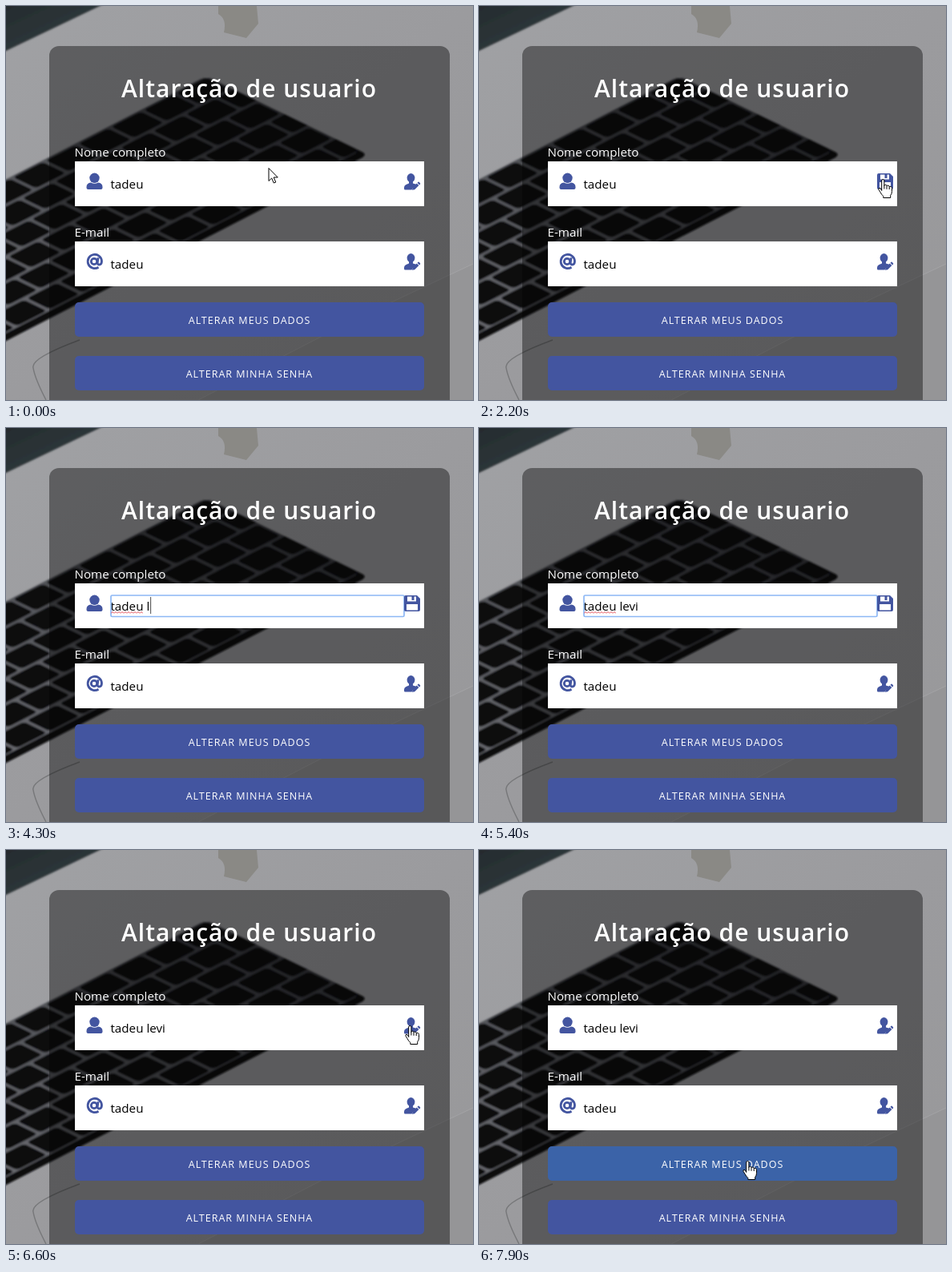
An HTML page that plays this animation: 583 by 492 pixels, repeating every 8 s.

```html
<!DOCTYPE html>
<html lang="pt">
<head>
<meta charset="utf-8">
<title>Altaração de usuario</title>
<style>
html, body { margin: 0; width: 100%; height: 100%; overflow: hidden; background: #9a9a9c; }
svg { display: block; width: 583px; height: 492px; font-family: "Open Sans", "Noto Sans", sans-serif; }
.title { font-size: 30px; font-weight: 600; letter-spacing: 1px; }
.label, .value { font-size: 15.2px; }
.value { fill: #000; }
.caption { font-size: 12.5px; font-weight: 500; letter-spacing: 1px; }
.title, .label, .caption { fill: #fff; }
.title, .caption { text-anchor: middle; }
.blue { fill: #4355a0; }

/* One loop is 8 s, so 1% is 80 ms. */
.step { animation: 8s step-end infinite; }
#pointer { animation-name: move; }
#arrow { animation-name: arrow; }
#hand { animation-name: hand; }
#ibeam { animation-name: ibeam; }
#typing { animation-name: type; }
#caret { animation-name: blink; }
.focus { animation-name: focus; }
#edit1 { animation-name: edit; }
#save1 { animation-name: save; }
#wave2 { animation-name: wave; }
#main { animation: hover 8s linear infinite; }

@keyframes move {
  0% { transform: translate(328px, 202px); }
  7.5% { transform: translate(328px, 203px); }
  8.75% { transform: translate(395px, 214px); }
  10% { transform: translate(488px, 232px); }
  11.25% { transform: translate(535px, 234px); }
  12.5% { transform: translate(519px, 225px); }
  13.75% { transform: translate(504px, 216px); }
  75% { transform: translate(498px, 221px); }
  76.25% { transform: translate(502px, 221px); }
  78.75% { transform: translate(504px, 219px); }
  87.5% { transform: translate(478px, 246px); }
  88.75% { transform: translate(425px, 300px); }
  90% { transform: translate(367px, 354px); }
  91.25% { transform: translate(345px, 377px); }
  92.5% { transform: translate(341px, 381px); }
  93.75% { transform: translate(338px, 384px); }
  95% { transform: translate(337px, 386px); }
  96.25% { transform: translate(336px, 387px); }
  97.5%, 100% { transform: translate(335px, 388px); }
}
@keyframes arrow {
  0%, 7.5%, 87.5% { visibility: visible; }
  1.25%, 13.75%, 91.25%, 100% { visibility: hidden; }
}
@keyframes hand {
  0%, 31.25%, 87.5% { visibility: hidden; }
  13.75%, 75%, 91.25%, 100% { visibility: visible; }
}
@keyframes ibeam {
  0%, 71.25%, 100% { visibility: hidden; }
  70% { visibility: visible; }
}
@keyframes type {
  0% { transform: translateX(171.7px); }
  45% { transform: translateX(175.7px); }
  53.75% { transform: translateX(179.5px); }
  56.25% { transform: translateX(188px); }
  58.75% { transform: translateX(195.6px); }
  61.25%, 100% { transform: translateX(199.7px); }
}
@keyframes blink {
  0%, 41.25%, 51.25%, 67.5%, 81.25%, 100% { visibility: hidden; }
  35%, 45%, 53.75%, 73.75% { visibility: visible; }
}
@keyframes focus {
  0%, 81.25%, 100% { visibility: hidden; }
  35% { visibility: visible; }
}
@keyframes wave {
  0%, 81.25%, 100% { visibility: hidden; }
  73.75% { visibility: visible; }
}
@keyframes edit {
  0%, 81.25%, 100% { visibility: visible; }
  23.75% { visibility: hidden; }
}
@keyframes save {
  0%, 81.25%, 100% { visibility: hidden; }
  23.75% { visibility: visible; }
}
@keyframes hover {
  0%, 91.25% { fill: #4355a0; }
  98.75%, 100% { fill: #3b63a8; }
}
</style>
</head>
<body>
<svg viewBox="0 0 583 492">
  <defs>
    <linearGradient id="metal" x2="1" y2="1">
      <stop offset="0" stop-color="#a0a1a4"/>
      <stop offset=".5" stop-color="#9b9b9e"/>
      <stop offset="1" stop-color="#98989a"/>
    </linearGradient>
    <linearGradient id="screen" x2="1" y2="1">
      <stop offset="0" stop-color="#22292c"/>
      <stop offset="1" stop-color="#384145"/>
    </linearGradient>
    <linearGradient id="gaps" x2="0" y2="1">
      <stop offset="0" stop-color="#3c3d42"/>
      <stop offset="1" stop-color="#77787d"/>
    </linearGradient>
    <filter id="soft"><feGaussianBlur stdDeviation="1.300"/></filter>
    <!-- Two staggered rows of keys -->
    <pattern id="keys" width="20" height="12" patternUnits="userSpaceOnUse">
      <g fill="#090a0f">
        <rect x=".5" y=".5" width="9" height="11" rx="1.300"/>
        <rect x="10.500" y="-5.500" width="9" height="11" rx="1.300"/>
        <rect x="10.500" y="6.500" width="9" height="11" rx="1.300"/>
      </g>
    </pattern>
    <pattern id="zigzag" x="131" y="229" width="4" height="3" patternUnits="userSpaceOnUse">
      <path d="M0 2.5L2 .5L4 2.5" fill="none" stroke="#e5414b"/>
    </pattern>
    <g id="edit" class="blue">
      <ellipse cx="8.500" cy="5.600" rx="4.900" ry="5.600"/>
      <path d="M6 10h5v2.500l4.300 1.300l-5 5.100l-.7 1.600H1.200Q0 20.500 0 19c0-3.500 1-4.600 6-6.400z"/>
      <path d="M10 20.800l.6-3.100l5.200-5.200l2.600 2.600l-5.200 5.200zM16.500 11.800l1-1q.6-.5 1.200 0l1.300 1.400q.5.600 0 1.200l-.9 1z"/>
    </g>
    <path id="save" class="blue" fill-rule="evenodd" d="M2 0H16L20 4V18Q20 20 18 20H2Q0 20 0 18V2Q0 0 2 0zM4 1.500V7.500H15V1.500H12.500V6H9.500V1.500zM3 11V18.500H17V11z"/>
  </defs>

  <!-- Laptop on a desk -->
  <rect width="583" height="492" fill="url(#metal)"/>
  <path d="M265 0H313L315 22L300 40L272 33Q276 16 265 10z" fill="#8a8985"/>
  <path d="M-10 -10H138L0 56L-10 60z" fill="url(#screen)" filter="url(#soft)"/>
  <path d="M583 322L430 394L240 492H583z" fill="#959597"/>
  <path d="M583 322L430 394L240 492" fill="none" stroke="#a3a3a5"/>
  <path d="M92 417Q30 440 34 452Q36 465 50 492" fill="none" stroke="#77787a" stroke-width="1.500"/>
  <g filter="url(#soft)">
    <g transform="matrix(3.2 1.55 -3.4 1.75 250 88)">
      <rect width="63" height="170" rx="2" fill="#0b0c11"/>
      <rect width="60" height="170" rx="2" fill="url(#gaps)"/>
      <rect width="60" height="170" rx="2" fill="url(#keys)"/>
    </g>
  </g>

  <!-- Form -->
  <rect x="54" y="50" width="500" height="470" rx="12" fill="#000" fill-opacity=".41"/>
  <text class="title" x="303.500" y="114">Altaração de usuario</text>
  <text class="label" x="85.500" y="188">Nome completo</text>
  <text class="label" x="85.500" y="288">E-mail</text>
  <path d="M86 194H522V250H86zM86 294H522V350H86z" fill="#fff"/>

  <g class="blue">
    <circle cx="110.500" cy="214.800" r="6.200"/>
    <path d="M106 220.500Q110.500 223 115 220.500Q120.500 221 120.500 226V227Q120.500 229 118.500 229H102.500Q100.500 229 100.500 227V226Q100.500 221 106 220.500z"/>
  </g>
  <g fill="none" stroke="#4355a0" stroke-width="2.800">
    <circle cx="110" cy="319" r="3.700"/>
    <path d="M115.500 326.300A8.700 8.700 0 1 1 119.500 318.500C119.500 324 114.200 324.300 114.200 320.500L115 314.300"/>
  </g>

  <text class="value" x="130.500" y="228">tadeu levi</text>
  <text class="value" x="130.500" y="328">tadeu</text>

  <!-- White cover follows the caret and hides what is not typed yet -->
  <g id="typing" class="step">
    <rect x=".3" y="211" width="60" height="22" fill="#fff"/>
    <rect id="caret" class="step" y="211" width="1.200" height="21" fill="#000"/>
  </g>
  <rect class="step focus" x="131" y="209" width="366" height="26.500" rx="1.500" fill="none" stroke="#8db8f5" stroke-width="1.700"/>
  <rect class="step focus" x="131" y="229" width="40" height="3" fill="url(#zigzag)"/>
  <rect id="wave2" class="step" x="176" y="229" width="24" height="3" fill="url(#zigzag)"/>
  <path id="ibeam" class="step" d="M366 209H373" stroke="#3c4a60" stroke-width="2"/>

  <g id="edit1" class="step"><use href="#edit" x="497" y="209"/></g>
  <g id="save1" class="step"><use href="#save" x="497" y="209"/></g>
  <use href="#edit" x="497" y="309"/>

  <rect id="main" x="86" y="370" width="436" height="43" rx="5"/>
  <rect class="blue" x="86" y="437" width="436" height="43" rx="5"/>
  <text class="caption" x="304" y="397">ALTERAR MEUS DADOS</text>
  <text class="caption" x="304" y="464">ALTERAR MINHA SENHA</text>

  <g id="pointer" class="step" fill="#fff" stroke="#000" stroke-linejoin="round">
    <path id="arrow" class="step" d="M0 .5V16.500L3.700 13L6.300 19L8.800 18L6.200 12H11.300z"/>
    <g id="hand" class="step">
      <path d="M-1.300 14.500V2Q-1.300 .5 .3 .5Q1.900 .5 1.900 2V8.300Q2.200 7 3.700 7.200Q5 7.400 5 8.800Q5.500 7.800 6.900 8.100Q8.200 8.400 8.200 9.700Q9 9 10.200 9.500Q11.500 10 11.500 11.300V15.500Q11.500 18.500 9.700 20.500V23.500H.8V21.500Q-1.500 19.500-3 16.500L-5 13.300Q-5.500 11.500-4 11.300Q-2.500 11.300-1.300 14.500z"/>
      <path d="M1.900 8V12.500M5 9V12.800M8.200 9.800V13" fill="none"/>
    </g>
  </g>
</svg>
</body>
</html>
```
